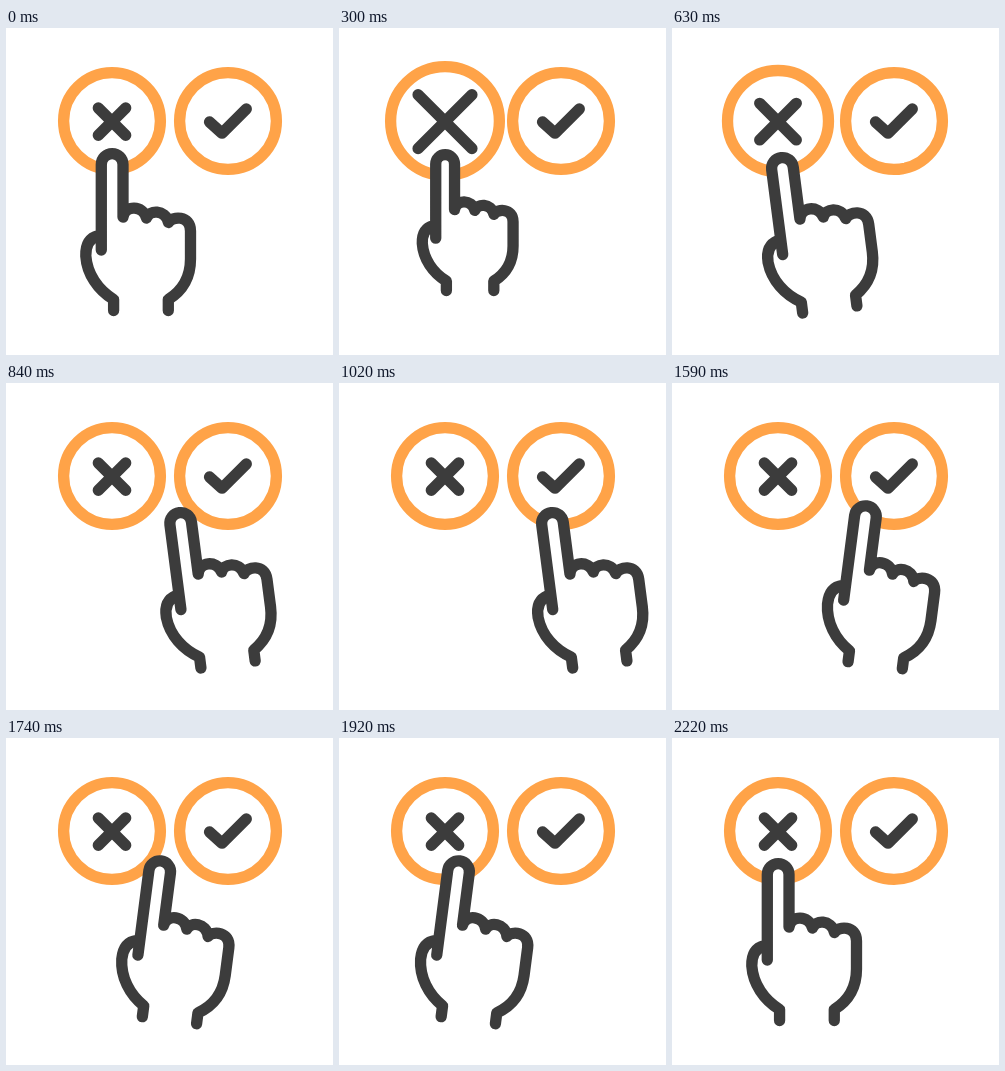
An HTML page that plays this animation: 327x327 px, repeating every 2250 ms.

```html
<!DOCTYPE html>
<html lang="en">
<head>
<meta charset="utf-8">
<title>Choose yes or no</title>
<style>
  html, body { margin: 0; width: 100%; height: 100%; overflow: hidden; background: #fff; }
  svg { display: block; width: 100%; height: 100%; }
  path, circle { fill: none; stroke-width: 11.3; stroke-linecap: round; stroke-linejoin: round; vector-effect: non-scaling-stroke; }
  path { stroke: #3c3c3c; }
  circle { stroke: #ffa348; }
  #hand { fill: #fff; }
</style>
</head>
<body>
<svg viewBox="0 0 327 327">
  <circle id="ring" cx="106" cy="93" r="48.4"/>
  <circle cx="222" cy="93" r="48.4"/>
  <path id="cross"/>
  <path d="M203.5 94 L216 105.2 L240.3 81"/>
  <path id="hand" d="M95.3 222 V136.5 A10.8 10.8 0 0 1 117 136.5 V189
    C119 177 137 177 140.5 190 C143 182 159 181 162.5 194.5
    C166 188 184.5 187 184.5 203 V231 C184.5 250 176 263 162.3 271.5 V282.5
    M92.5 207.5 C83 210 79.5 218 79.8 228 C81 246 92 262 107.6 271.5 V282.5"/>
</svg>
<script>
const LOOP = 2250, TRAVEL = 117, TILT = 7.4;
const [ring, cross, hand] = ['ring', 'cross', 'hand'].map(id => document.getElementById(id));

// Eased 0 to 1 between two times
const ramp = (t, from, to) => {
  const x = Math.min(1, Math.max(0, (t - from) / (to - from)));
  return (1 - Math.cos(Math.PI * x)) / 2;
};

function draw(now) {
  const t = now % LOOP;

  const pop = ramp(t, 60, 325) - ramp(t, 435, 760);
  const arm = 13.7 + 13.5 * pop;
  ring.setAttribute('r', 48.4 + 6.1 * pop);
  cross.setAttribute('d',
    `M${106 - arm} ${93.6 - arm} l${2 * arm} ${2 * arm} m0 ${-2 * arm} l${-2 * arm} ${2 * arm}`);

  const shift = TRAVEL * (ramp(t, 515, 1056) - ramp(t, 1326, 2006));
  const tilt = TILT * (ramp(t, 1020, 1210) - ramp(t, 440, 580)
    + ramp(t, 1330, 1480) - ramp(t, 1930, 2230));
  const press = 1 - 0.133 * (ramp(t, 50, 300) - ramp(t, 300, 540));
  hand.setAttribute('transform',
    `translate(${shift}) rotate(${tilt} 132 204) translate(106 133) scale(${press}) translate(-106 -133)`);

  requestAnimationFrame(draw);
}
requestAnimationFrame(draw);
</script>
</body>
</html>
```
